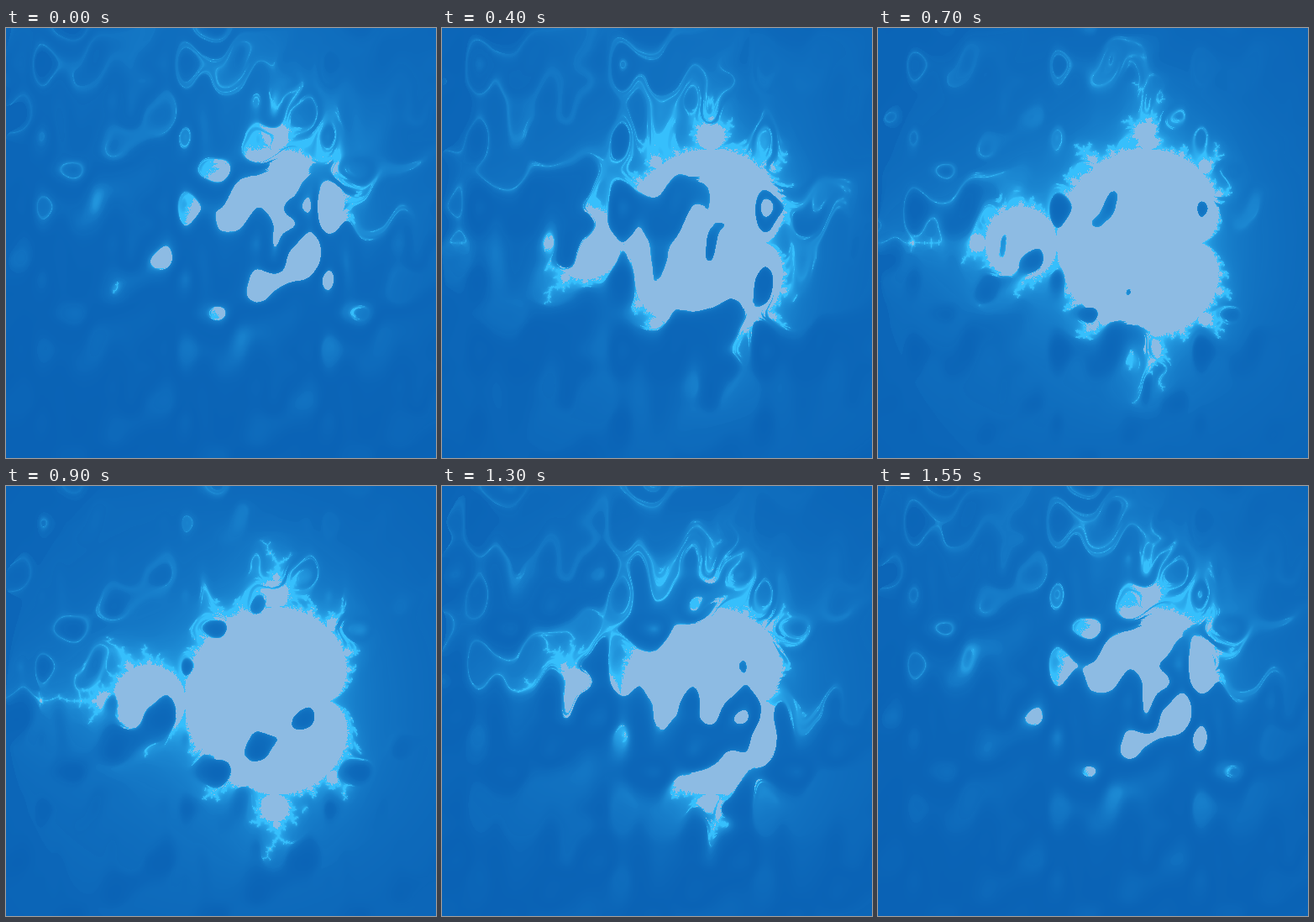
Recreate the animation shown at these times as an HTML page with a canvas. Size 512x512 px, loop 1600 ms.

```html
<!DOCTYPE html>
<html>
<head>
<meta charset="utf-8">
<style>
html, body { margin: 0; width: 100%; height: 100%; overflow: hidden; background: #0a62b6; }
canvas { display: block; width: 512px; height: 512px; }
</style>
</head>
<body>
<canvas id="stage" width="512" height="512"></canvas>
<script>
const SIZE = 512, LOOP = 1600, STEP = 50;
const UNIT = SIZE / 3, MAX_ITER = 72, PEAK = 0.85;
const ctx = document.getElementById('stage').getContext('2d');

// Tiling 8x8 lattice: when the disturbance peaks at each node, in 10 ms units
const LATTICE = [
  [22, 5, -3, -40, -56, 3, 10, 18],
  [17, -6, 28, 0, -6, 42, 34, 27],
  [1, -15, 64, 30, 28, 50, 20, 24],
  [20, -10, 38, 8, 38, 33, -2, 20],
  [-12, -38, 0, -10, 14, 8, -22, 24],
  [-45, -56, 5, -20, 10, 0, -18, 13],
  [-33, -20, 38, -20, 2, -12, -46, -40],
  [6, 2, 20, -20, -15, -20, -52, -22]
];

function cubic(a, b, c, d, t) {
  return b + 0.5 * t * (c - a + t * (2 * a - 5 * b + 4 * c - d + t * (3 * (b - c) + d - a)));
}

function latticeRow(j, i, t) {
  const r = LATTICE[j & 7];
  return cubic(r[(i + 7) & 7], r[i & 7], r[(i + 1) & 7], r[(i + 2) & 7], t);
}

function peakTime(x, y) {
  const u = x / UNIT * 8, v = y / UNIT * 8;
  const i = Math.floor(u), j = Math.floor(v), s = u - i;
  return 10 * cubic(
    latticeRow(j + 7, i, s), latticeRow(j, i, s),
    latticeRow(j + 1, i, s), latticeRow(j + 2, i, s), v - j);
}

const delay = new Float32Array(SIZE * SIZE);
for (let y = 0, p = 0; y < SIZE; y++)
  for (let x = 0; x < SIZE; x++) delay[p++] = peakTime(x + 0.5, y + 0.5);

// Smooth escape count of z² + c from z = n + ni, or -1 if it stays bounded
function escape(cx, cy, n) {
  let x = n, y = n;
  for (let k = 0; k < MAX_ITER; k++) {
    const xx = x * x, yy = y * y;
    if (xx + yy > 4) return Math.max(0, k + 1 - Math.log2(Math.log(xx + yy) / 2));
    y = 2 * x * y + cy;
    x = xx - yy + cx;
  }
  return -1;
}

function render(time) {
  const img = ctx.createImageData(SIZE, SIZE), d = img.data;
  for (let y = 0, p = 0; y < SIZE; y++) {
    const cy = (y + 0.5) / UNIT - 1.5;
    for (let x = 0; x < SIZE; x++, p++) {
      const phase = 2 * Math.PI * (time - delay[p]) / LOOP;
      const s = escape((x + 0.5) / UNIT - 2, cy, PEAK * (0.5 + 0.5 * Math.cos(phase)));
      const q = p * 4, k = Math.min(s, 18);
      d[q] = s < 0 ? 141 : 5 + 2.7 * k;
      d[q + 1] = s < 0 ? 187 : 88 + 5.7 * k;
      d[q + 2] = s < 0 ? 227 : 173 + 4.4 * k;
      d[q + 3] = 255;
    }
  }
  return img;
}

const cache = [];
let shown = -1;

function tick() {
  const step = Math.floor(performance.now() % LOOP / STEP);
  if (step !== shown) {
    cache[step] = cache[step] || render(step * STEP);
    ctx.putImageData(cache[step], 0, 0);
    shown = step;
  }
  requestAnimationFrame(tick);
}
tick();
</script>
</body>
</html>
```
